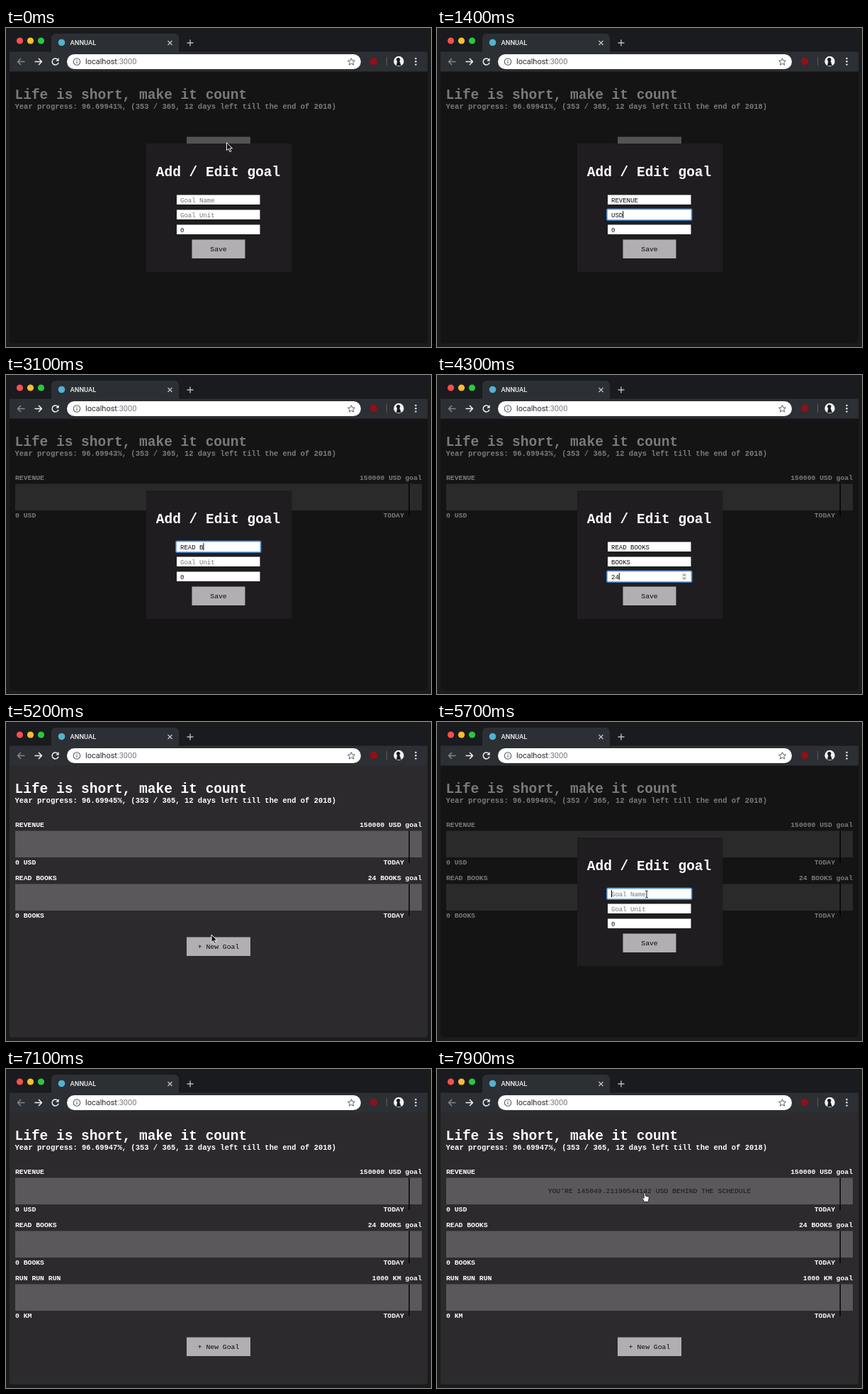
An HTML page with a canvas for the animation above (8000 ms loop, 600 px wide and 450 px high).

```html
<!DOCTYPE html>
<html>
<head>
<meta charset="utf-8">
<style>
html, body { margin: 0; width: 100%; height: 100%; overflow: hidden; background: #1b1b1c; }
canvas { display: block; }
</style>
</head>
<body>
<canvas id="stage" width="600" height="450"></canvas>
<script>
const c = document.getElementById('stage').getContext('2d');
const LOOP = 8000;
const MONO = '"Courier New", "Liberation Mono", monospace';
const SANS = 'Roboto, sans-serif';

// Each goal: dialog open and save times, focus and first-key times per field, ms per key.
const goals = [
  { open: 0, save: 2100, values: ['REVENUE', 'USD', '150000'], focus: [330, 930, 1420], start: [400, 1020, 1500], key: 75 },
  { open: 2470, save: 4500, values: ['READ BOOKS', 'BOOKS', '24'], focus: [2600, 3480, 4050], start: [2680, 3550, 4150], key: 75 },
  { open: 5500, save: 7100, values: ['RUN RUN RUN', 'KM', '1000'], focus: [5690, 6400, 6590], start: [5750, 6450, 6650], key: 60 }
];

// The pointer hides while typing; each path lists [time, x, y].
const paths = [
  [[0, 311.5, 161.5], [300, 298, 242], [400, 298, 242]],
  [[2250, 298, 243], [2680, 298, 242]],
  [[4800, 296, 243], [5000, 294, 250], [5200, 290, 300], [5350, 293, 314], [5520, 293, 314], [5680, 296, 243], [5750, 296, 243]],
  [[7300, 296, 252], [7530, 296, 246], [7750, 293, 178], [7900, 293, 175], [LOOP, 293, 175]]
];

const inside = (p, x, y, w, h) => p && p.x >= x && p.x <= x + w && p.y >= y && p.y <= y + h;

function rect(x, y, w, h, fill, r = 0) {
  c.fillStyle = fill;
  c.beginPath();
  c.roundRect(x, y, w, h, r);
  c.fill();
}

function disc(x, y, r, fill) {
  c.fillStyle = fill;
  c.beginPath();
  c.arc(x, y, r, 0, 7);
  c.fill();
}

function text(s, x, y, size, fill, weight = 700, align = 'left', family = MONO) {
  c.font = `${weight} ${size}px ${family}`;
  c.textAlign = align;
  c.fillStyle = fill;
  c.fillText(s, x, y);
}

function line(d, color, width = 1.4) {
  c.strokeStyle = color;
  c.lineWidth = width;
  c.stroke(new Path2D(d));
}

function shape(d, fill, stroke, width = 1) {
  const p = new Path2D(d);
  c.lineJoin = 'round';
  c.fillStyle = fill;
  c.fill(p);
  c.strokeStyle = stroke;
  c.lineWidth = width;
  c.stroke(p);
}

function browser() {
  rect(0, 0, 600, 450, '#1b1b1c');
  rect(5, 2, 590, 443, '#2c2a2d', 4);
  rect(5, 2, 590, 32, '#1a1b1f', [4, 4, 0, 0]);
  rect(5, 33.5, 590, 28, '#2c2f33');
  rect(64, 8, 180, 26, '#2c2f33', [6, 6, 0, 0]);
  ['#fc4f4b', '#fdbd2e', '#28c93f'].forEach((color, i) => disc(19.5 + 15 * i, 18, 4.6, color));
  disc(78.5, 20.5, 4.8, '#4fb4d0');
  text('ANNUAL', 90.5, 24.2, 9.4, '#eef0f2', 500, 'left', SANS);
  line('M228.5 18l6 6m0-6l-6 6', '#c4c6c8', 1.2);
  line('M255.5 21h9m-4.5-4.5v9', '#b9bbbe');

  line('M26.5 47.5h-10m4.5-4.5l-4.5 4.5l4.5 4.5', '#85878b', 1.5);
  line('M40.5 47.5h10m-4.5-4.5l4.5 4.5l-4.5 4.5', '#f0f1f2', 1.5);
  line('M73 44.4a4.5 4.5 0 1 0 1 4.3', '#f0f1f2', 1.5);
  shape('M74.5 42.5v4h-4z', '#f0f1f2', '#f0f1f2', .3);
  rect(86, 37, 415, 21, '#fff', 10.5);
  line('M104.7 47.5a4.7 4.7 0 1 0-9.4 0a4.7 4.7 0 1 0 9.4 0M100 46.8v3.2M100 44.5v1.2', '#5b5e62', 1.1);
  text('localhost', 112, 51.3, 11, '#26282b', 400, 'left', SANS);
  const w = c.measureText('localhost').width;
  text(':3000', 112 + w, 51.3, 11, '#77797c', 400, 'left', SANS);
  line('M487.5 42.6l1.4 3.3l3.6.3l-2.7 2.4l.8 3.5l-3.1-1.9l-3.1 1.9l.8-3.5l-2.7-2.4l3.6-.3z', '#5b5e62', 1);
  disc(519, 47, 5.3, '#8e1119');
  rect(537, 41, 1, 12, '#5a5c60');
  disc(554.5, 47, 7.2, '#f3f3f3');
  disc(553.8, 44.5, 2.6, '#19191a');
  shape('M551.5 53l1-6h3l2 6z', '#19191a', '#19191a', .5);
  [43, 47.3, 51.6].forEach(y => disc(578.5, y, 1.2, '#f0f1f2'));
}

function page(t, pointer) {
  const digit = t < 2100 ? 1 : t < 4500 ? 3 : t < 5500 ? 5 : t < 7100 ? 6 : 7;
  text('Life is short, make it count', 12.5, 100, 19.5, '#fff');
  text(`Year progress: 96.6994${digit}%, (353 / 365, 12 days left till the end of 2018)`, 12.5, 114.2, 10.5, '#fff');

  const saved = goals.filter(g => t >= g.save);
  let hot = false;
  saved.forEach(({ values: [name, unit, amount] }, i) => {
    const y = 153.5 + 75 * i;
    text(name, 13, y - 5.5, 9.75, '#fff');
    text(`${amount} ${unit} goal`, 587, y - 5.5, 9.75, '#fff', 700, 'right');
    rect(13, y, 574, 37.5, '#5a585b');
    rect(568.5, y, 1.5, 45.5, '#050505');
    text(`0 ${unit}`, 13, y + 47, 9.75, '#fff');
    text('TODAY', 562, y + 47, 9.75, '#fff', 700, 'right');
    if (inside(pointer, 13, y, 574, 37.5)) {
      hot = true;
      const behind = amount / 150000 * 145049.21190544142;
      text(`YOU'RE ${behind} ${unit} BEHIND THE SCHEDULE`, 300, y + 21.5, 9.75, '#161517', 400, 'center');
    }
  });

  const y = 153.5 + 75 * saved.length;
  rect(255, y, 90, 26.5, '#b1afb1');
  text('+ New Goal', 300, y + 16.5, 9.75, '#0c0c0c', 400, 'center');
  return hot || inside(pointer, 255, y, 90, 26.5);
}

function field(g, i, t, focused) {
  const y = 235.5 + 21 * i;
  if (focused) {
    rect(239, y - 2, 121.5, 17.5, '#3f78b8', 2.5);
    rect(240, y - 1, 119.5, 15.5, '#7db2ec', 1.5);
  }
  rect(241, y, 117.5, 13.5, '#fff');
  const count = Math.max(0, Math.floor((t - g.start[i]) / g.key) + 1);
  const typed = g.values[i].slice(0, count);
  const blank = ['Goal Name', 'Goal Unit', '0'][i];
  if (focused && !typed && i === 2) rect(246, y + 1.5, 5.4, 10.5, '#b4d5fe');
  text(typed || blank, 246, y + 10, 9, typed || i === 2 ? '#080808' : '#757575', 400);
  if (!focused) return;
  if (typed || i < 2) rect(246 + 5.4 * typed.length, y + 1.8, 1, 10, '#000');
  if (i === 2) {
    rect(345.5, y + 1.7, 7, 10.5, '#e7e7e7', 2.5);
    line(`M347.5 ${y + 5.5}l1.5-1.7l1.5 1.7M347.5 ${y + 8.5}l1.5 1.7l1.5-1.7`, '#444', .9);
  }
}

function dialog(g, t) {
  rect(5, 61.5, 590, 383.5, 'rgba(0,0,0,.52)', [0, 0, 4, 4]);
  rect(198, 163, 205.5, 181, '#1f1d20');
  text('Add / Edit goal', 299.5, 209, 19.5, '#fff', 700, 'center');
  const active = g.focus.filter(f => t >= f).length - 1;
  for (let i = 0; i < 3; i++) field(g, i, t, i === active);
  rect(262.5, 298.5, 75, 26.5, '#b1afb1');
  text('Save', 300, 315, 9.75, '#0c0c0c', 400, 'center');
}

function pointerAt(t) {
  const path = paths.find(p => t >= p[0][0] && t < p[p.length - 1][0]);
  if (!path) return null;
  const i = path.findIndex(p => p[0] > t);
  const [t0, x0, y0] = path[i - 1], [t1, x1, y1] = path[i];
  const k = (t - t0) / (t1 - t0);
  return { x: x0 + (x1 - x0) * k, y: y0 + (y1 - y0) * k };
}

function drawPointer(p, kind) {
  c.save();
  c.translate(p.x, p.y);
  if (kind === 'hand') {
    shape('M-1 0q1-1.2 2 0l.4 4l4 1q1.2.4 1 2l-.8 3.5l-.6 2h-5l-3-4.5q-1.2-2 .2-2l2 1.5z', '#fff', '#111', .9);
  } else if (kind === 'text') {
    line('M-2-5q2 0 2 1.5v7q0 1.5-2 1.5M2-5q-2 0-2 1.5M2 5q-2 0-2-1.5', '#222', 1);
  } else {
    shape('M0 0v11l2.6-2.4l2 4.4l1.9-.9l-2-4.2h3.6z', '#111', '#f2f2f2', 1);
  }
  c.restore();
}

function draw(t) {
  const pointer = pointerAt(t);
  const current = goals.find(g => t >= g.open && t < g.save);
  browser();
  const hot = page(t, current ? null : pointer);
  if (current) dialog(current, t);
  if (!pointer) return;
  const overField = current && inside(pointer, 241, 235.5, 117.5, 13.5);
  drawPointer(pointer, hot ? 'hand' : overField ? 'text' : 'arrow');
}

const began = performance.now();
function tick() {
  draw((performance.now() - began) % LOOP);
  requestAnimationFrame(tick);
}
tick();
</script>
</body>
</html>
```
